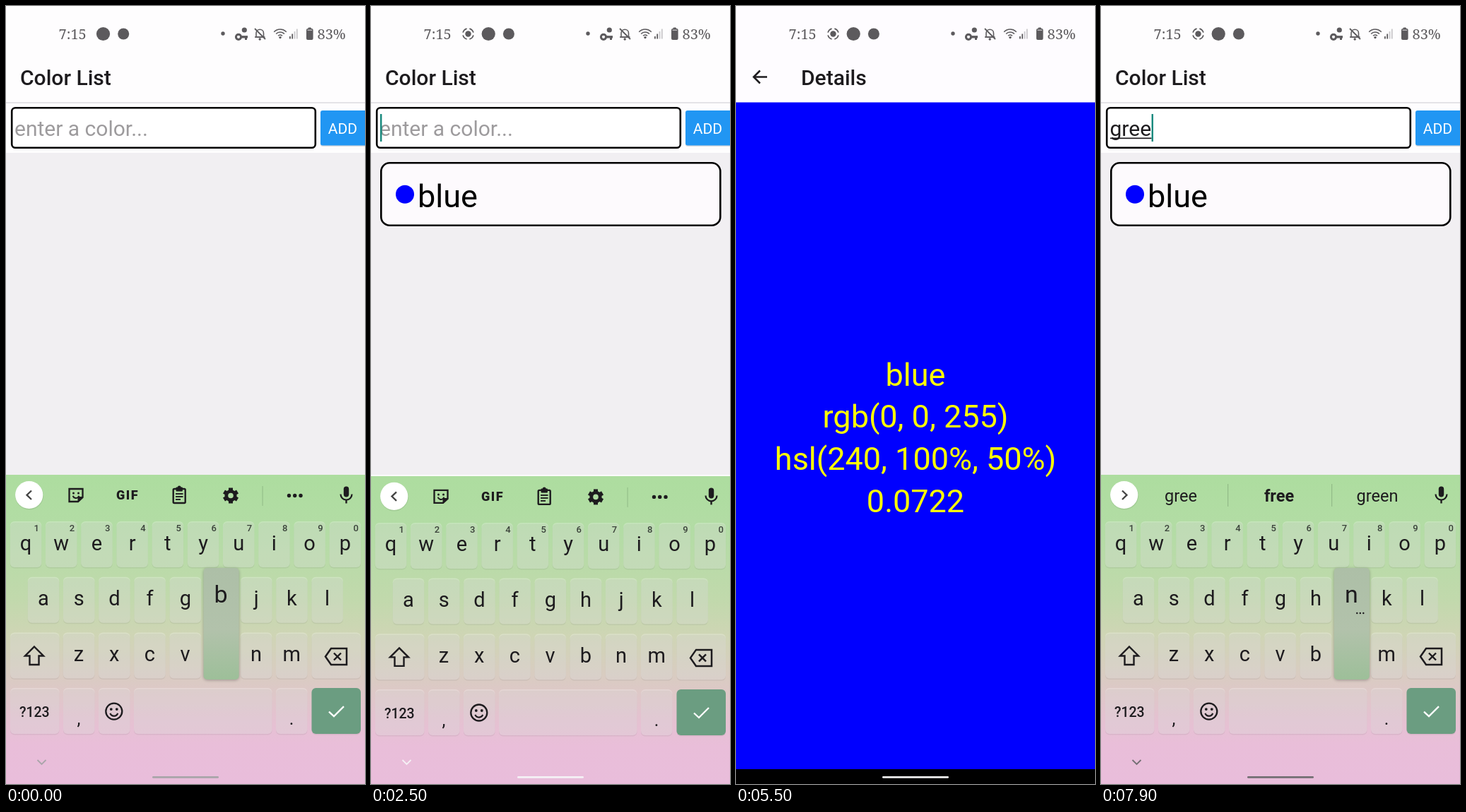
An HTML page with a canvas for the animation above (8 s loop, 508 by 1102 pixels).

```html
<!DOCTYPE html>
<html lang="en">
<head>
<meta charset="utf-8">
<title>Color list</title>
<style>
html, body { margin: 0; width: 100%; height: 100%; overflow: hidden; background: #fff; }
canvas { display: block; width: 508px; height: 1102px; }
</style>
</head>
<body>
<canvas id="stage"></canvas>
<script>
const W = 508, H = 1102, LOOP = 8000;
const KB_TOP = 664, NAV_TOP = 1081;
const INK = '#1d1b1e', GREY = '#5c5a5d';
const canvas = document.getElementById('stage');
const ratio = window.devicePixelRatio || 1;
canvas.width = W * ratio;
canvas.height = H * ratio;
const c = canvas.getContext('2d');

const clamp = v => Math.max(0, Math.min(1, v));
const within = (t, a, b) => t >= a && t < b;
const mix = (a, b, k) => Math.round(a + (b - a) * k);

// ---------- timing ----------
const KEYBOARD = [[-800, 1700], [2250, 3800], [6750, 1e5]];
const ADDED = 1580, PRESS = [4450, 5050];
const OPEN = 5050, BACK = 6050;
const TYPED = [
  [80, 'b', ['b', 'but', 'be']],
  [300, 'bl', ['bl', 'black', 'blue']],
  [500, 'blu', ['blu', 'blue', 'blur']],
  [800, 'blue', ['blue', 'blueberry', 'bluegrass']],
  [ADDED, '', null],
  [7200, 'g', ['g', 'good', 'go']],
  [7400, 'gr', ['gr', 'great', 'green']],
  [7600, 'gre', ['gre', 'great', 'green']],
  [7800, 'gree', ['gree', 'free', 'green']]
];
const TAPS = [[0, 80, 'b'], [200, 300, 'l'], [400, 500, 'u'], [700, 800, 'e'],
  [7100, 7200, 'g'], [7300, 7400, 'r'], [7500, 7600, 'e'], [7700, 7800, 'e'], [7860, 8000, 'n']];

// ---------- drawing helpers ----------
function box(x, y, w, h, r, fill, stroke, lw) {
  c.beginPath();
  c.roundRect(x, y, w, h, r);
  if (fill) { c.fillStyle = fill; c.fill(); }
  if (stroke) { c.strokeStyle = stroke; c.lineWidth = lw; c.stroke(); }
}
function disc(x, y, r, fill) {
  c.beginPath();
  c.arc(x, y, r, 0, Math.PI * 2);
  c.fillStyle = fill;
  c.fill();
}
function arc(x, y, r, a, b, color, lw) {
  c.beginPath();
  c.arc(x, y, r, a, b);
  c.strokeStyle = color;
  c.lineWidth = lw;
  c.stroke();
}
function line(pts, color, lw, close) {
  c.beginPath();
  for (let i = 0; i < pts.length; i += 2) c.lineTo(pts[i], pts[i + 1]);
  if (close) c.closePath();
  c.strokeStyle = color;
  c.lineWidth = lw;
  c.stroke();
}
function shape(pts, fill) {
  c.beginPath();
  for (let i = 0; i < pts.length; i += 2) c.lineTo(pts[i], pts[i + 1]);
  c.fillStyle = fill;
  c.fill();
}
function text(s, x, y, size, color, align = 'left', weight = 400, family = 'Roboto, sans-serif') {
  c.font = `${weight} ${size}px ${family}`;
  c.textAlign = align;
  c.fillStyle = color;
  c.fillText(s, x, y);
}

// ---------- status bar ----------
function statusBar(t) {
  const serif = '"Noto Serif", serif';
  text('7:15', 74.5, 46.5, 20, GREY, 'left', 400, serif);
  let x = 137.5;
  if (t >= 300) {
    disc(x, 39.5, 4.2, GREY);
    for (let i = 0; i < 4; i++) {
      const a = i * Math.PI / 2;
      arc(x, 39.5, 7.6, a + 0.25, a + 1.32, GREY, 1.8);
    }
    x += 28.7;
  }
  disc(x, 39.5, 9.6, GREY);
  disc(x + 28.7, 39.5, 8, GREY);

  disc(307, 39, 2.7, GREY);
  arc(329, 43.8, 3.6, 0, 7, GREY, 3);
  line([333, 43.8, 342, 43.8], GREY, 3.4);
  line([339.5, 43.8, 339.5, 48], GREY, 3);
  disc(337.3, 34, 3.6, GREY);

  c.beginPath();
  c.moveTo(354, 44);
  c.lineTo(354, 38.5);
  c.bezierCurveTo(354, 31.5, 364.5, 31.5, 364.5, 38.5);
  c.lineTo(364.5, 44);
  c.closePath();
  c.strokeStyle = GREY;
  c.lineWidth = 1.6;
  c.stroke();
  line([352, 44, 366.5, 44], GREY, 1.6);
  disc(359.2, 47, 1.7, GREY);
  line([352, 32, 367, 47], GREY, 1.8);

  for (const r of [4, 8, 12]) arc(388, 45, r, -Math.PI * 0.76, -Math.PI * 0.24, GREY, 1.6);
  disc(388, 44.6, 1.7, GREY);
  for (let i = 0; i < 4; i++) {
    c.fillStyle = i < 2 ? GREY : '#c9c7ca';
    c.fillRect(401 + i * 3.3, 43 - i * 3.5, 1.8, 3.5 + i * 3.5);
  }
  box(427.5, 30.5, 4.5, 3, 1, GREY);
  box(425, 32, 9.6, 16, 2, GREY);
  c.fillStyle = '#bdbbbe';
  c.fillRect(426.5, 33.5, 6.6, 1.4);
  text('83%', 440.5, 46.5, 20, GREY, 'left', 400, serif);
}

// ---------- app screens ----------
function listScreen(t, value, caret) {
  c.fillStyle = '#fefdfe';
  c.fillRect(0, 0, W, 209);
  c.fillStyle = '#f1eff2';
  c.fillRect(0, 208, W, NAV_TOP - 208);
  c.fillStyle = '#e4e3e7';
  c.fillRect(0, 136, W, 2);
  text('Color List', 20, 112, 30, INK, 'left', 500);

  box(8.2, 144.2, 429.6, 56.6, 5, '#fff', '#000', 2.6);
  if (value) {
    text(value, 12.5, 184, 30, INK);
    c.fillRect(13, 186.5, c.measureText(value).width, 1.7);
  } else {
    text('enter a color...', 12, 184, 30, '#9d9b9d');
  }
  if (caret) {
    const x = value ? 13 + c.measureText(value).width : 13;
    c.fillStyle = '#15887c';
    c.fillRect(x, 153, 2.4, 39);
  }

  box(445, 149, 66, 50, 3, '#dcdbde');
  box(445, 148, 66, 49.5, 3, within(t, 1300, 1540) ? '#1f82d6' : '#2196f3');
  text('ADD', 476.5, 181, 21, '#fff', 'center');

  if (t < ADDED) return;
  const pressed = within(t, ...PRESS);
  box(14.3, 222.3, 480, 88.4, 12, pressed ? '#ffa500' : '#fdfafd', '#000', 2.6);
  c.save();
  c.globalAlpha *= pressed ? 0.87 : 1;
  disc(48, 266.7, 13, '#00f');
  text('blue', 66, 284.5, 45, '#000');
  c.restore();
}

function detailScreen() {
  c.fillStyle = '#fefcff';
  c.fillRect(0, 0, W, 137);
  c.fillStyle = '#00f';
  c.fillRect(0, 136.5, W, NAV_TOP - 136.5);
  line([44, 100.5, 25.5, 100.5], INK, 2.5);
  line([34, 91.5, 25, 100.5, 34, 109.5], INK, 2.5);
  text('Details', 92, 112, 30, INK, 'left', 500);
  ['blue', 'rgb(0, 0, 255)', 'hsl(240, 100%, 50%)', '0.0722'].forEach((s, i) =>
    text(s, 254, 537.5 + i * 59.8, 45, '#ff0', 'center'));
}

function zoomed(scale, alpha, draw) {
  c.save();
  c.globalAlpha = alpha;
  c.translate(W / 2, NAV_TOP / 2);
  c.scale(scale, scale);
  c.translate(-W / 2, -NAV_TOP / 2);
  draw();
  c.restore();
}

function screens(t, value, caret) {
  const list = () => listScreen(t, value, caret);
  const ease = p => 1 - Math.pow(1 - clamp(p), 4);
  if (t < OPEN || t >= BACK + 400) return list();
  if (t < BACK) {
    const p = ease((t - OPEN) / 440);
    if (p < 1) zoomed(1 + 0.15 * p, 1, list);
    zoomed(0.85 + 0.15 * p, clamp((t - OPEN - 30) / 100), detailScreen);
  } else {
    const p = ease((t - BACK) / 400);
    zoomed(1.1 - 0.1 * p, 1, list);
    zoomed(1 - 0.1 * p, 1 - clamp((t - BACK - 30) / 100), detailScreen);
  }
}

// ---------- keyboard ----------
const ROWS = [['qwertyuiop', 28], ['asdfghjkl', 53], ['zxcvbnm', 103]];
const PITCH = 50.2, ROW_STEP = 78.7;
const rowTop = r => 730 + r * ROW_STEP;

function key(x, y, w, fill = 'rgba(255,255,255,.25)') {
  box(x, y + 1.5, w, 65, 6, 'rgba(60,60,50,.08)');
  box(x, y, w, 65, 6, fill);
}

function mic(x, y) {
  box(x - 3.7, y - 12, 7.4, 15, 3.7, INK);
  arc(x, y - 1, 8, 0, Math.PI, INK, 2.2);
  line([x, y + 7, x, y + 12], INK, 2.4);
}

function toolbar() {
  // sticker
  line([89.5, 684, 108.5, 684, 108.5, 696, 102, 702, 89.5, 702], INK, 2.3, true);
  shape([109, 695, 101.5, 695, 101.5, 703], INK);
  disc(95.5, 690, 1.5, INK);
  disc(102.5, 690, 1.5, INK);
  arc(99, 692.5, 4.5, 0.3, Math.PI - 0.3, INK, 2);

  c.letterSpacing = '1.4px';
  text('GIF', 172, 699, 18, INK, 'center', 900);
  c.letterSpacing = '0px';

  // clipboard
  box(236.7, 684, 17, 20, 1.5, null, INK, 2.4);
  box(240.5, 681.5, 9.4, 6, 1, INK);
  disc(245.2, 682, 2.4, INK);
  [691, 695, 699].forEach((y, i) => line([240, y, i < 2 ? 250.5 : 247, y], INK, 1.9));

  // gear
  for (let i = 0; i < 6; i++) {
    const a = i * Math.PI / 3 + Math.PI / 6 * 3;
    const dx = Math.cos(a), dy = Math.sin(a);
    line([318 + dx * 5, 693.5 + dy * 5, 318 + dx * 11, 693.5 + dy * 11], INK, 6);
  }
  arc(318, 693.5, 6.2, 0, 7, INK, 4.8);

  c.fillStyle = 'rgba(60,90,60,.22)';
  c.fillRect(362.5, 680, 1.2, 28);
  for (const x of [400.5, 408.7, 417]) disc(x, 693.5, 2.7, INK);
}

function suggestions(words) {
  words.forEach((w, i) => text(w, 113 + i * 139, 702, 23.5, INK, 'center', w === 'free' ? 700 : 400));
  c.fillStyle = 'rgba(60,90,60,.25)';
  c.fillRect(179, 677, 1.2, 32);
  c.fillRect(326, 677, 1.2, 32);
}

function bottomRow(y) {
  key(6, y, 69.5);
  text('?123', 40.3, y + 41, 19.5, INK, 'center', 500);
  key(81, y, 44.5);
  text(',', 103, y + 52, 25, INK, 'center');
  key(131, y, 44.5);
  arc(152.8, y + 33, 11.5, 0, 7, INK, 2.3);
  disc(148.8, y + 30, 1.9, INK);
  disc(156.8, y + 30, 1.9, INK);
  arc(152.8, y + 33.8, 5.8, 0.35, Math.PI - 0.35, INK, 2.2);
  key(181, y, 195.5);
  key(382, y, 44.5);
  text('.', 404, y + 52, 25, INK, 'center');
  key(432.5, y, 69.5, '#6b9d81');
  line([457, y + 33.5, 464, y + 40, 478, y + 26], '#fff', 2.3);
}

function popup(ch) {
  const r = ROWS.findIndex(row => row[0].includes(ch));
  const x = ROWS[r][1] + PITCH * ROWS[r][0].indexOf(ch) + 0.8;
  const y = rowTop(r) - 91.4;
  const g = c.createLinearGradient(0, y, 0, y + 158);
  g.addColorStop(0, '#adbfa7');
  g.addColorStop(0.55, '#b2c2ab');
  g.addColorStop(1, '#9dbf99');
  c.save();
  c.shadowColor = 'rgba(40,40,40,.35)';
  c.shadowBlur = 4 * ratio;
  c.shadowOffsetY = ratio;
  box(x - 25, y, 50, 158, 5, g);
  c.restore();
  text(ch, x - 0.5, y + 49, 34, INK, 'center');
  if (ch === 'n') for (let i = 0; i < 3; i++) disc(x + 7.5 + i * 4.5, y + 64, 1.2, INK);
}

function keyboard(t, dy, words) {
  c.save();
  c.translate(0, dy);
  const g = c.createLinearGradient(0, KB_TOP, 0, H);
  [[0, '#addd9f'], [0.18, '#b3dca5'], [0.4, '#c1d9ac'], [0.52, '#cfd5b5'], [0.66, '#dacbc3'],
    [0.78, '#e4c2d0'], [0.87, '#e9bed9'], [1, '#e9bddb']].forEach(s => g.addColorStop(...s));
  c.fillStyle = g;
  c.fillRect(0, KB_TOP, W, H - KB_TOP);

  disc(33, 693.5, 20, 'rgba(60,90,60,.12)');
  disc(32.7, 692.5, 19.6, '#fff');
  const d = words ? 1 : -1;
  line([33 - 3 * d, 686.5, 33 + 3.5 * d, 692.7, 33 - 3 * d, 699], '#444', 2.3);
  if (words) suggestions(words); else toolbar();
  mic(481.5, 692.5);

  ROWS.forEach(([letters, x0], r) => {
    [...letters].forEach((ch, i) => {
      const x = x0 + PITCH * i;
      key(x - 22.2, rowTop(r), 44.5);
      text(ch, x, rowTop(r) + 40.5, 29, INK, 'center');
      if (r === 0) text((i + 1) % 10, x + 15.3, 744, 13, '#3a423a', 'center', 500);
    });
  });

  const y = rowTop(2);
  key(6, y, 69.5);
  line([40, 907.5, 53, 920.5, 46.5, 920.5, 46.5, 933, 33.5, 933, 33.5, 920.5, 27, 920.5], INK, 2.4, true);
  key(432.5, y, 69.5);
  line([452, 921.5, 460, 910, 482, 910, 482, 933, 460, 933], INK, 2.5, true);
  line([464, 916.5, 474, 926.5], INK, 2.4);
  line([474, 916.5, 464, 926.5], INK, 2.4);
  bottomRow(rowTop(3));

  const tap = TAPS.find(p => within(t, p[0], p[1]));
  if (tap) popup(tap[2]);
  c.restore();
}

// ---------- frame ----------
function render(t) {
  c.setTransform(ratio, 0, 0, ratio, 0, 0);
  c.fillStyle = '#fefdfe';
  c.fillRect(0, 0, W, H);

  const typed = TYPED.filter(s => t >= s[0]).pop();
  const value = typed ? typed[1] : '';
  const kb = KEYBOARD.find(([a, b]) => within(t, a, b + 220));
  const shown = kb && t < kb[1];
  let caret = false;
  if (shown && typed) {
    const since = Math.max(typed[0], kb[0]);
    caret = (t - since) % 1000 < 500;
  }

  screens(t, value, caret);
  statusBar(t);

  const opening = kb && t < kb[0] + 300;
  if (opening) {
    c.fillStyle = '#fdfcfd';
    c.fillRect(0, KB_TOP, W, NAV_TOP - KB_TOP);
  }
  c.fillStyle = '#000';
  c.fillRect(0, NAV_TOP, W, H - NAV_TOP);

  let tint = '#eee';
  if (kb) {
    const rise = Math.pow(1 - clamp((t - kb[0]) / 300), 3);
    const fall = Math.pow(clamp((t - kb[1]) / 220), 2);
    keyboard(t, (H - KB_TOP) * Math.max(rise, fall), typed && typed[2]);
    const v = shown ? mix(245, 62, clamp((t - kb[0] - 300) / 1200)) : 245;
    tint = `rgb(${v},${v - 4},${v})`;
    if (shown) line([44.5, 1068, 50.5, 1074, 56.5, 1068], tint, 1.8);
  }
  box(207, 1091, 94, 2.8, 1.4, tint);
}

const start = performance.now();
function tick() {
  render((performance.now() - start) % LOOP);
  requestAnimationFrame(tick);
}
tick();
</script>
</body>
</html>
```
